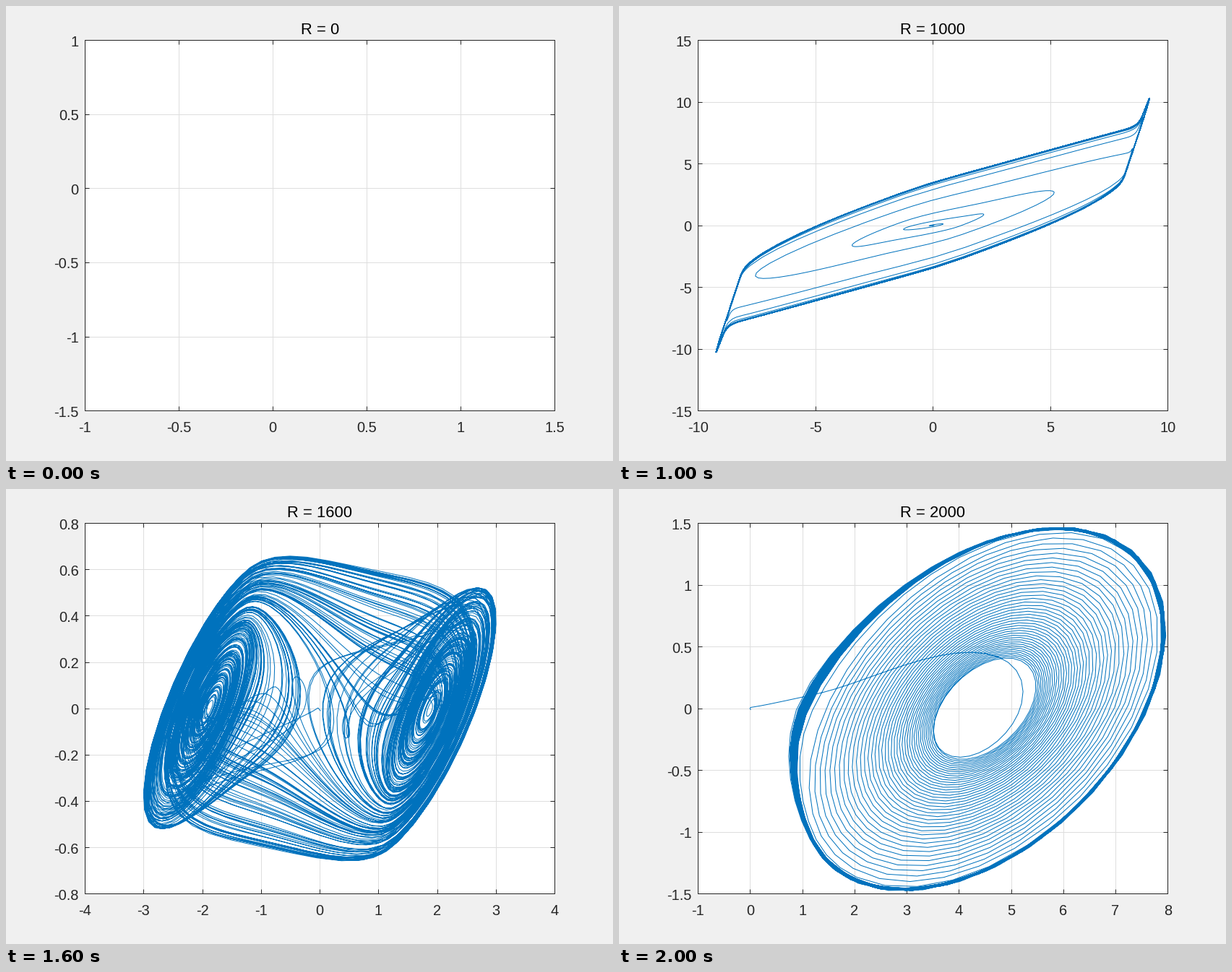
A matplotlib script that plays this animation: 840x630 px, repeating every 2100 ms.

```python
from math import ceil, floor

import matplotlib.pyplot as plt
import numpy as np
from matplotlib.animation import FuncAnimation

plt.rcParams["font.family"] = "Liberation Sans"
plt.rcParams["agg.path.chunksize"] = 20000

# Double scroll circuit, SI units
C1, C2, L = 10e-9, 100e-9, 18e-3
VSAT = 9.0
R1, R3 = 220, 2200
R4, R6 = 22000, 3300
KNEE1 = VSAT * R3 / (R1 + R3)
KNEE2 = VSAT * R6 / (R4 + R6)

START = [0.01, -0.01, 0.0]
T_END = 0.1
RTOL, FLOOR = 1e-3, 1e-3

# Dense output of the Dormand-Prince pair, four points per step
DENSE = np.array([
    [1, -183 / 64, 37 / 12, -145 / 128],
    [0, 0, 0, 0],
    [0, 1500 / 371, -1000 / 159, 1000 / 371],
    [0, -125 / 32, 125 / 12, -375 / 64],
    [0, 9477 / 3392, -729 / 106, 25515 / 6784],
    [0, -11 / 7, 11 / 3, -55 / 28],
    [0, 3 / 2, -4, 5 / 2],
])
WEIGHTS = np.array([DENSE @ [s, s**2, s**3, s**4] for s in (0.25, 0.5, 0.75, 1)])


def diode(u):
    """Current of the odd, piecewise linear negative resistor."""
    a = abs(u)
    g = -a / R3 if a < KNEE1 else (a - VSAT) / R1
    g += -a / R6 if a < KNEE2 else (a - VSAT) / R4
    return g if u > 0 else -g


def solve(r):
    """Adaptive Runge-Kutta 5(4) path of both capacitor voltages."""
    if r == 0:
        return np.array([START[:2]])

    def rate(state):
        u, v, i = state
        flow = (v - u) / r
        return (flow - diode(u)) / C1, (i - flow) / C2, -v / L

    y, t, failed = START, 0.0, False
    k1 = rate(y)
    h = 0.8 * RTOL**0.2 / max(abs(a) / max(abs(s), FLOOR) for s, a in zip(y, k1))
    states, slopes, steps = [], [], []
    while T_END - t > 1e-9:
        h = min(h, T_END / 10)
        if 1.1 * h >= T_END - t:
            h = T_END - t
        k2 = rate([s + h * a / 5 for s, a in zip(y, k1)])
        k3 = rate([s + h * (3 / 40 * a + 9 / 40 * b) for s, a, b in zip(y, k1, k2)])
        k4 = rate([s + h * (44 / 45 * a - 56 / 15 * b + 32 / 9 * c)
                   for s, a, b, c in zip(y, k1, k2, k3)])
        k5 = rate([s + h * (19372 / 6561 * a - 25360 / 2187 * b
                            + 64448 / 6561 * c - 212 / 729 * d)
                   for s, a, b, c, d in zip(y, k1, k2, k3, k4)])
        k6 = rate([s + h * (9017 / 3168 * a - 355 / 33 * b + 46732 / 5247 * c
                            + 49 / 176 * d - 5103 / 18656 * e)
                   for s, a, b, c, d, e in zip(y, k1, k2, k3, k4, k5)])
        new = [s + h * (35 / 384 * a + 500 / 1113 * c + 125 / 192 * d
                        - 2187 / 6784 * e + 11 / 84 * f)
               for s, a, c, d, e, f in zip(y, k1, k3, k4, k5, k6)]
        k7 = rate(new)
        err = h * max(
            abs(71 / 57600 * a - 71 / 16695 * c + 71 / 1920 * d
                - 17253 / 339200 * e + 22 / 525 * f - g / 40)
            / max(abs(s), abs(n), FLOOR)
            for s, n, a, c, d, e, f, g in zip(y, new, k1, k3, k4, k5, k6, k7))

        if err > RTOL:
            h *= 0.5 if failed else max(0.1, 0.8 * (RTOL / err) ** 0.2)
            failed = True
            continue
        states.append(y[:2])
        slopes.append([k[:2] for k in (k1, k2, k3, k4, k5, k6, k7)])
        steps.append(h)
        t += h
        y, k1 = new, k7
        if not failed:
            h /= max(0.2, 1.25 * (err / RTOL) ** 0.2)
        failed = False

    moves = np.einsum("sj,njc->nsc", WEIGHTS, np.array(slopes))
    path = np.array(states)[:, None] + np.array(steps)[:, None, None] * moves
    return np.vstack([START[:2], path.reshape(-1, 2)])


def nice_ticks(values, most):
    """Finest 1-2-5 ticks that enclose the values, at most so many."""
    lo, hi = values.min(), values.max()
    if lo == hi:
        lo, hi = lo - 1, hi + 1
    for step in (m * 10.0**e for e in range(-3, 3) for m in (1, 2, 5)):
        a, b = floor(lo / step), ceil(hi / step)
        if b - a < most:
            return np.arange(a, b + 1) * step


W, H, DPI = 840, 630, 120
PX = 72 / DPI
INK = "#262626"

fig = plt.figure(figsize=(W / DPI, H / DPI), dpi=DPI, facecolor="#f0f0f0")
ax = fig.add_axes([109.2 / W, 69.8 / H, 650 / W, 513 / H])

paths = [solve(100 * n) for n in range(21)]


def label(text, xy, coords, offset, align, size=20, color=INK):
    ax.annotate(text, xy, xycoords=coords, xytext=offset,
                textcoords="offset pixels", ha=align, va="baseline",
                fontsize=size * PX, color=color)


def draw(n):
    ax.clear()
    x, y = paths[n].T
    xt, yt = nice_ticks(x, 10), nice_ticks(y, 11)
    ax.set(xlim=(xt[0], xt[-1]), ylim=(yt[0], yt[-1]), xticks=xt, yticks=yt)
    ax.set_axisbelow(True)
    ax.grid(color="#dedede", lw=PX)
    ax.tick_params(direction="in", length=6 * PX, width=PX, color=INK,
                   top=True, right=True, labelbottom=False, labelleft=False)
    for spine in ax.spines.values():
        spine.set(color=INK, linewidth=PX)
    ax.plot(x, y, color="#0072bd", lw=PX)

    for v in xt:
        label(f"{round(v, 6) + 0:g}", (v, 0), ax.get_xaxis_transform(), (0, -30), "center")
    for v in yt:
        label(f"{round(v, 6) + 0:g}", (0, v), ax.get_yaxis_transform(), (-8.5, -8.5), "right")
    label(f"R = {100 * n}", (0.5, 1), "axes fraction", (0, 8), "center", 22, "black")


anim = FuncAnimation(fig, draw, frames=21, interval=100, init_func=lambda: None)
plt.show()
```
